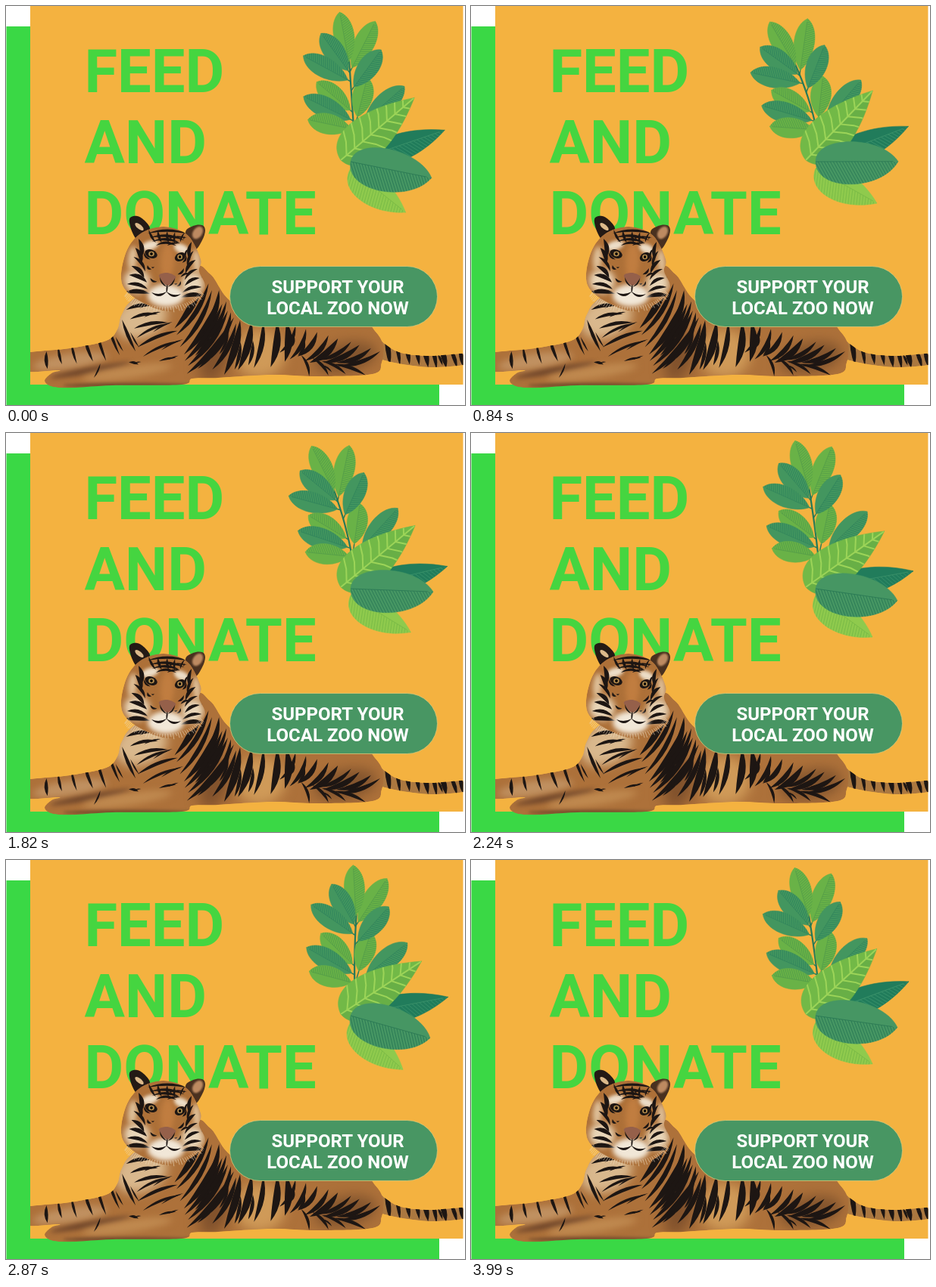
An HTML page with a canvas that plays this animation: 606x528 px, repeating every 4.06 s.

```html
<!DOCTYPE html>
<html lang="en">
<head>
<meta charset="utf-8">
<title>Feed and donate</title>
<style>
  html, body { margin: 0; width: 100%; height: 100%; overflow: hidden; background: #fff; }
  svg, canvas { position: absolute; left: 0; top: 0; width: 606px; height: 528px; }
  text { font-family: Roboto, sans-serif; font-weight: 700; }
  .title { font-size: 79.5px; fill: #45d540; }
  .label { font-size: 24px; fill: #fff; text-anchor: middle; }
</style>
</head>
<body>
<svg viewBox="0 0 606 528">
  <rect x="0.5" y="27" width="571.5" height="501" fill="#3ad845"/>
  <rect x="32" width="571.5" height="501" fill="#f4b240"/>
  <g class="title">
    <text x="103.5" y="114">FEED</text>
    <text x="103.5" y="208">AND</text>
    <text x="103.5" y="302">DONATE</text>
  </g>
</svg>
<canvas id="tiger" width="606" height="528"></canvas>
<svg viewBox="0 0 606 528">
  <rect x="295.5" y="344.5" width="274" height="80" rx="40" fill="#489663" stroke="#d9c878" stroke-width="0.8"/>
  <g class="label">
    <text x="438" y="380">SUPPORT YOUR</text>
    <text x="438" y="408">LOCAL ZOO NOW</text>
  </g>
</svg>
<canvas id="plant" width="606" height="528"></canvas>
<script>
const RAD = Math.PI / 180;
const mix = (p, q, u) => [p[0] + (q[0] - p[0]) * u, p[1] + (q[1] - p[1]) * u];

// ---------- tiger ----------
const tg = document.getElementById('tiger').getContext('2d');
const INK = '#1d1613';

let seed = 7;
function random() {
  seed = (seed * 16807) % 2147483647;
  return seed / 2147483647;
}
const jitter = amount => (random() - 0.5) * 2 * amount;

// Closed smooth outline through x,y pairs.
function outline(...v) {
  const n = v.length / 2, path = new Path2D();
  const at = i => { const k = (i + n) % n * 2; return [v[k], v[k + 1]]; };
  path.moveTo(...at(0));
  for (let i = 0; i < n; i++) {
    const [a, b, c, d] = [i - 1, i, i + 1, i + 2].map(at);
    path.bezierCurveTo(
      b[0] + (c[0] - a[0]) / 6, b[1] + (c[1] - a[1]) / 6,
      c[0] - (d[0] - b[0]) / 6, c[1] - (d[1] - b[1]) / 6, c[0], c[1]);
  }
  return path;
}

function fill(color, path) {
  tg.fillStyle = color;
  tg.fill(path);
}

function spot(color, x, y, rx, ry, turn = 0, blur = 0) {
  tg.filter = blur ? `blur(${blur}px)` : 'none';
  tg.fillStyle = color;
  tg.beginPath();
  tg.ellipse(x, y, rx, ry, turn, 0, 7);
  tg.fill();
  tg.filter = 'none';
}

// Tapered stroke, bent sideways by bow.
function stripe(p, q, w, bow = 0) {
  const len = Math.hypot(q[0] - p[0], q[1] - p[1]);
  const nx = (p[1] - q[1]) / len, ny = (q[0] - p[0]) / len;
  const [mx, my] = mix(p, q, 0.5);
  tg.fillStyle = INK;
  tg.beginPath();
  tg.moveTo(...p);
  tg.quadraticCurveTo(mx + nx * (bow * 2 + w), my + ny * (bow * 2 + w), ...q);
  tg.quadraticCurveTo(mx + nx * (bow * 2 - w), my + ny * (bow * 2 - w), ...p);
  tg.fill();
}

// Stripes starting along a-b and ending along c-d, some with a short companion.
function band(n, a, b, c, d, w, bow, wild = 2) {
  for (let i = 0; i < n; i++) {
    const u = i / (n - 1);
    const p = mix(a, b, u), q = mix(c, d, u);
    p[0] += jitter(wild);
    q[0] += jitter(wild * 2);
    q[1] += jitter(wild * 2);
    stripe(p, q, w * (0.75 + random() * 0.5), bow);
    if (random() < wild * 0.2) {
      const from = mix(p, q, 0.4), to = mix(p, q, 0.95);
      stripe([from[0] + w, from[1]], [to[0] + w * 1.4, to[1] - 3], w * 0.55, bow / 2);
    }
  }
}

function inside(path, draw) {
  tg.save();
  tg.clip(path);
  draw();
  tg.restore();
}

function drawTail() {
  const tail = outline(478, 426, 500, 447, 522, 459, 560, 463, 612, 460,
    612, 473, 565, 478, 530, 475, 500, 469, 482, 462);
  inside(tail, () => {
    fill('#ab7840', tail);
    band(10, [488, 430], [598, 456], [495, 474], [606, 481], 6, -1, 1);
  });
}

function drawBody() {
  const body = outline(20, 461, 84, 453, 132, 443, 147, 428, 153, 408, 172, 385,
    245, 345, 270, 355, 306, 396, 400, 408, 470, 418, 488, 431, 498, 449, 496, 472,
    484, 487, 410, 490, 350, 488, 280, 492, 246, 493, 232, 501, 140, 502, 92, 505,
    62, 504, 51, 496, 60, 486, 70, 482, 20, 483);
  inside(body, () => {
    fill('#ad713a', body);
    spot('#d9b88d', 178, 412, 36, 27, -0.4, 7);
    spot('#cf9a58', 335, 460, 34, 32, 0, 8);
    spot('#80512c', 275, 465, 18, 35, 0.3, 9);
    spot('#83552e', 448, 465, 42, 20, -0.2, 8);
    spot('#c09161', 85, 470, 50, 10, -0.15, 5);
    spot('#6b432a', 112, 482, 54, 4, -0.18, 3);
    spot('#c08a50', 160, 485, 60, 8, -0.15, 5);
    spot('#6f482b', 160, 502, 85, 3, 0, 2);
    band(7, [54, 457], [152, 415], [56, 479], [168, 460], 4, 1);
    band(6, [159, 402], [180, 464], [196, 400], [233, 440], 4, -3);
    band(3, [123, 473], [200, 470], [119, 492], [224, 464], 3, -1);
    band(7, [260, 358], [300, 412], [222, 430], [240, 485], 8, -6);
    band(4, [282, 376], [304, 420], [255, 430], [275, 480], 7, -5);
    band(5, [309, 416], [372, 418], [286, 489], [366, 470], 9, -4);
    band(9, [384, 423], [496, 457], [364, 462], [442, 477], 7, -5);
    band(4, [388, 462], [432, 474], [398, 488], [474, 487], 4, -3);
  });
}

// Draws in head space, once for each cheek.
function bothSides(draw) {
  for (const side of [-1, 1]) {
    tg.save();
    tg.translate(212, side < 0 ? 340 : 344);
    tg.scale(side < 0 ? 1 : -0.88, 1);
    draw();
    tg.restore();
  }
}

function drawHead() {
  fill('#241a15', outline(163, 282, 173, 278, 184, 285, 190, 297, 176, 310, 167, 300));
  spot('#dcb98a', 176, 292, 7, 3, 0.7);
  fill('#49301f', outline(237, 300, 247, 291, 259, 290, 263, 297, 259, 310, 249, 322));
  spot('#bd8a61', 253, 300, 6, 9, 0.6, 1);

  const head = outline(176, 302, 208, 292, 240, 303, 257, 335, 255, 351, 263, 372,
    248, 392, 218, 404, 185, 395, 154, 370, 157, 330);
  inside(head, () => {
    fill('#ad7038', head);
    bothSides(() => {
      spot('#e8d5b8', -39, 24, 17, 16, 0.3, 4);
      spot('#dfc19a', -45, -6, 6, 16, 0.1, 3);
      spot('#ecddc7', -22, -23, 12, 6, -0.3, 2);
      band(7, [-38, -32], [-56, 40], [-34, -6], [-22, 42], 5, -3, 1);
      band(3, [-30, -14], [-22, 20], [-22, -6], [-14, 26], 3, 2, 1);
    });
    spot('#f1e7d7', 211, 383, 24, 15, 0, 3);
    spot('#c07d40', 213, 338, 9, 24, 0.05, 3);
    band(4, [186, 301], [198, 317], [238, 303], [226, 319], 4, -4, 1);
    band(5, [188, 296], [236, 300], [198, 312], [230, 314], 3, 1, 1);
  });

  bothSides(() => {
    spot(INK, -20.5, -12, 8.5, 5.5, 0.35);
    spot('#b98f4e', -20, -12, 3.8, 3.2);
    spot('#090909', -20, -12, 1.9, 2);
  });
  fill('#95604a', outline(202, 356, 213, 353, 224, 358, 220, 365, 213, 370, 206, 364));
  stripe([203, 359], [213, 372], 2, 2);
  stripe([223, 360], [213, 372], 2, -2);
  stripe([213, 368], [212, 380], 2);
  stripe([212, 378], [192, 379], 3, -4);
  stripe([212, 378], [231, 381], 3, 4);

  // Fine fur along the ruff.
  tg.strokeStyle = 'rgba(237,219,189,.75)';
  tg.lineWidth = 0.8;
  tg.beginPath();
  for (let i = 0; i < 40; i++) {
    const a = (0.05 + i / 43) * Math.PI;
    const x = 209 + 47 * Math.cos(a), y = 373 + 25 * Math.sin(a);
    tg.moveTo(x, y);
    tg.lineTo(x + 6 * Math.cos(a), y + 4 + random() * 4);
  }
  tg.stroke();
}

tg.beginPath();
tg.rect(32, 0, 571.5, 528);
tg.clip();
drawTail();
drawBody();
drawHead();

// ---------- plant ----------
const pl = document.getElementById('plant').getContext('2d');
const LIGHT = ['#69b247', '#559f49'];
const TEAL = ['#43965f', '#31865d'];
const TWIG = '#257a58';

function line(color, width, ...points) {
  pl.strokeStyle = color;
  pl.lineWidth = width;
  pl.beginPath();
  for (const p of points) pl.lineTo(...p);
  pl.stroke();
}

function halfLeaf(len, a, b, w) {
  const p = new Path2D();
  p.moveTo(0, 0);
  p.bezierCurveTo(a, w, b, w, len, 0);
  p.closePath();
  return p;
}

function hatch(half, len, w, step, slant, color) {
  pl.save();
  pl.clip(half);
  for (let x = -len * 0.3; x < len; x += step) line(color, 0.9, [x, 0], [x + slant, w]);
  pl.restore();
}

function drawVeins(len, top, low, color) {
  pl.save();
  const both = new Path2D(top);
  both.addPath(low);
  pl.clip(both);
  line(color, 2, [0, 0], [len, 0]);
  for (let x = 10; x < len - 10; x += 14) {
    for (const side of [-1, 1]) {
      line(color, 2, [x, 0], [x + 11, side * 14], [x + 19, side * 30]);
    }
  }
  pl.restore();
}

// Leaf along +x: a, b place the control points, up and down set the bulge.
function leaf({ len, a, b, up, down, colors, step = 4, slant = 12, veins }) {
  const top = halfLeaf(len, a, b, -up), low = halfLeaf(len, a, b, down);
  for (const [half, color] of [[top, colors[0]], [low, colors[veins ? 1 : 0]]]) {
    pl.fillStyle = pl.strokeStyle = color;
    pl.lineWidth = 0.5;
    pl.fill(half);
    pl.stroke(half);
  }
  if (veins) return drawVeins(len, top, low, veins);
  hatch(low, len, down, step, slant, colors[1]);
  line(colors[1], 0.9, [0, 0], [len * 0.94, 0]);
}

function placed(x, y, deg, draw) {
  pl.save();
  pl.translate(x, y);
  pl.rotate(deg * RAD);
  draw();
  pl.restore();
}

const ROOT = [461, 190], STEM = [-8, -118], STEPS = 12;
const turnAt = (s, bend) => bend * (0.3 + 1.1 * s);

// Stem point when the turn grows towards the top.
function stemAt(s, bend) {
  let [x, y] = ROOT;
  const d = s / STEPS;
  for (let i = 0; i < STEPS; i++) {
    const r = turnAt((i + 0.5) * d, bend) * RAD, c = Math.cos(r), n = Math.sin(r);
    x += (STEM[0] * c - STEM[1] * n) * d;
    y += (STEM[0] * n + STEM[1] * c) * d;
  }
  return [x, y];
}

// Each fan steps down the stem while its leaves open by a fixed angle.
const fans = [
  { s: 0.21, drop: 0, angle: -76, open: 34.5, reach: 73, odd: 16, stalk: 19, leaves: [LIGHT, TEAL] },
  { s: 0.87, drop: 0.21, angle: -63.5, open: 9.5, reach: 75, odd: -8, stalk: 6, leaves: [LIGHT, TEAL] },
  { s: 0.95, drop: 0.093, angle: -100.5, open: -25.5, reach: 71, odd: -6, stalk: 4, leaves: [LIGHT, TEAL, TEAL] },
  { s: 0.42, drop: 0.097, angle: -140, open: -14, reach: 62, odd: 11, stalk: 4, leaves: [LIGHT, TEAL, LIGHT] }
];

function drawSprig(bend) {
  line(TWIG, 2.2, ...Array.from({ length: 11 }, (_, i) => stemAt(i / 10, bend)));
  for (const { s, drop, angle, open, reach, odd, stalk, leaves } of fans) {
    leaves.forEach((colors, k) => {
      const at = s - drop * k, len = reach + odd * (k % 2) - stalk;
      placed(...stemAt(at, bend), turnAt(at, bend) + angle + open * k, () => {
        line(TWIG, 1.4, [0, 0], [stalk, 0]);
        pl.translate(stalk, 0);
        leaf({ len, a: len * 0.3, b: len * 0.84, up: 18, down: 18, colors, step: 3, slant: 9 });
      });
    });
  }
}

const darkLeaf = { len: 126, a: 30, b: 78, up: 21, down: 27, colors: ['#217c5b', '#37906a'], step: 5, slant: 22 };
const lowLeaf = { len: 93, a: 4, b: 56, up: 22, down: 33, colors: ['#8fca4d', '#79bb47'], slant: 14 };
const veinLeaf = { len: 127.5, a: 5, b: 60, up: 38, down: 36, colors: ['#72b947', '#68af46'], veins: '#9cd458' };
const midLeaf = { len: 109, a: 0, b: 86, up: 35, down: 40, colors: ['#469663', '#2b7a56'], slant: 22 };

const PERIOD = 3770, LOOP = 4060, TICK = 70;

function drawPlant(t) {
  const swing = (mid, amp, phase) => mid + amp * Math.cos((phase + 360 * t / PERIOD) * RAD);
  pl.clearRect(0, 0, 606, 528);
  drawSprig(swing(-9.7, 11.7, 63) + 4.4);
  placed(460, 205, swing(-15.7, 6, 122), () => leaf(darkLeaf));
  placed(455, 215, swing(35.4, 7.2, 63), () => leaf(lowLeaf));
  placed(442, 204, swing(-39.7, 6.5, 96), () => leaf(veinLeaf));
  placed(455, 206, swing(7.2, 9.2, 63), () => leaf(midLeaf));
}

const start = performance.now();
function frame() {
  const t = (performance.now() - start) % LOOP;
  drawPlant(Math.floor(t / TICK) * TICK);
  requestAnimationFrame(frame);
}
frame();
</script>
</body>
</html>
```
